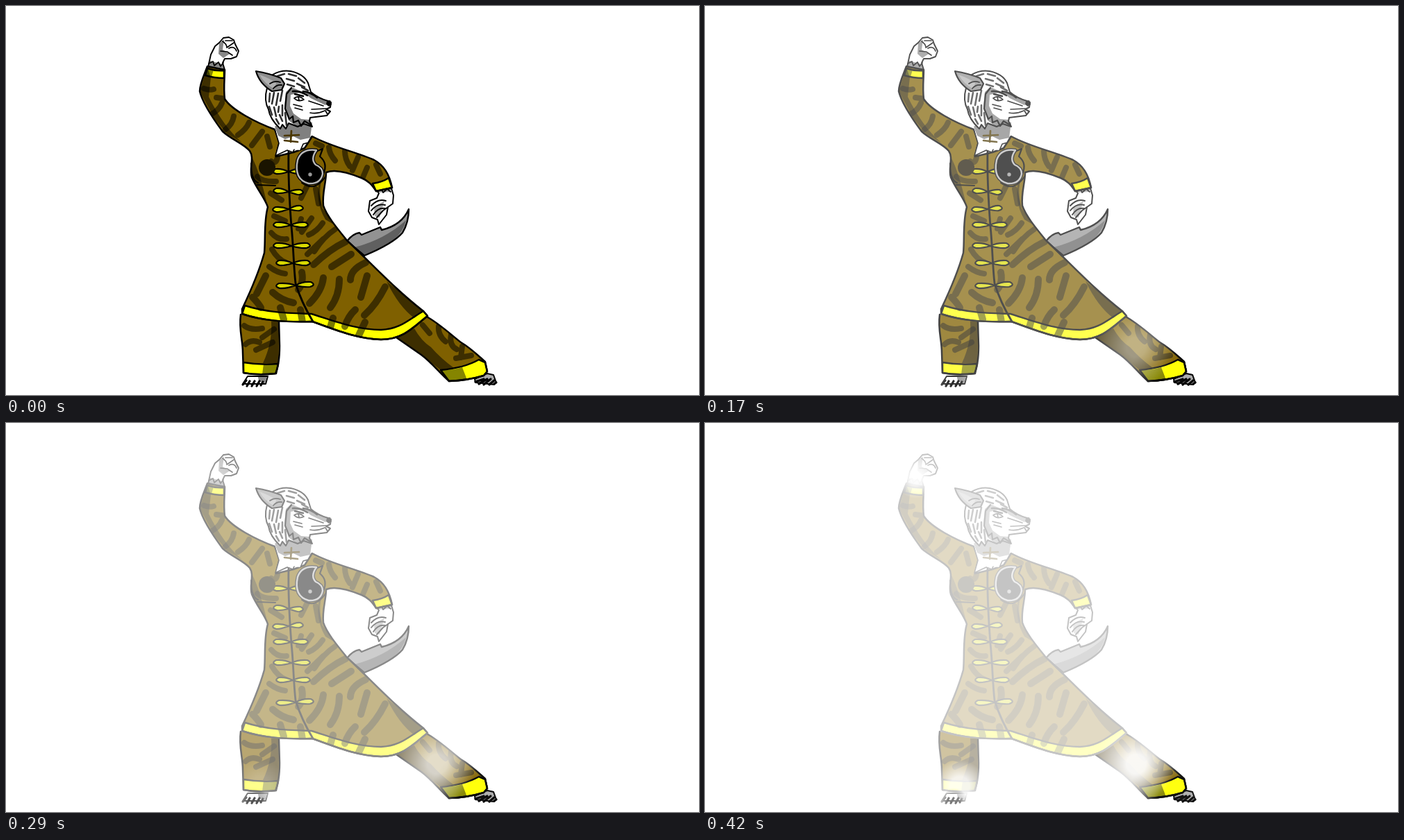
Write an HTML page with a canvas that moves like this. It is 998 px wide and 561 px high and loops after 870 ms.

```html
<!DOCTYPE html>
<html lang="en">
<head>
<meta charset="utf-8">
<title>Fading stance</title>
<style>
html, body { margin: 0; width: 100%; height: 100%; overflow: hidden; background: #fff; }
canvas { display: block; width: 100%; height: 100%; }
</style>
</head>
<body>
<canvas id="stage" width="998" height="561"></canvas>
<script>
const W = 998, H = 561, LOOP = 870;
const STEPS = [0, 40, 80, 130, 170, 210, 250, 290, 330, 380, 420];
const FADE = 0.077;
const BROWN = '#7f6000', YELLOW = '#ffff00', OLIVE = '#858500';
const screen = document.getElementById('stage').getContext('2d');
const layer = document.createElement('canvas');
layer.width = W;
layer.height = H;
const g = layer.getContext('2d');
let veil = 0;

const P = d => new Path2D(d);

// Mixes a hex colour with white.
function ink(hex) {
  const c = [1, 3, 5].map(i => parseInt(hex.slice(i, i + 2), 16));
  return `rgb(${c.map(v => Math.round(v + (255 - v) * veil))})`;
}
function fill(path, hex) {
  g.fillStyle = ink(hex);
  g.fill(path);
}
function line(path, width = 2.4, hex = '#000000') {
  g.strokeStyle = ink(hex);
  g.lineWidth = width;
  g.stroke(path);
}
function shape(path, hex, width = 2.4) {
  fill(path, hex);
  line(path, width);
}

const coat = {
  pieces: [P(`M290 87C286 98 279 112 279 123C283 140 298 162 312 181C324 192 343 199 351 209
    C358 219 350 234 354 247C360 262 374 279 377 290C371 312 374 335 372 356C364 385 350 416 340 437
    L340 444C370 454 400 456 441 455C475 467 505 480 540 481C572 481 588 462 607 447L601 440
    C560 408 530 375 491 338C478 322 462 303 457 288C455 270 461 255 461 240C475 234 500 243 512 248
    C522 252 527 258 533 267L556 262C553 246 545 230 530 222C503 210 468 203 441 188L430 205L414 211
    L389 217L394 195L387 178C360 168 325 150 315 134C313 118 315 105 315 92Z`)],
  bands: [
    P(`M344 432C375 442 405 443 440 444C475 455 505 467 540 467C568 466 580 452 601 440
      L607 447C588 462 572 481 540 481C505 480 475 467 441 455C400 456 370 454 340 444Z`),
    P('M290 90Q302 94 314 93L314 104Q300 104 287 100Z'),
    P('M528 256Q542 254 551 248L556 262L533 267Z')
  ],
  bandShade: P('M290 90L299 92L296 102L287 100Z'),
  shade: P(`M290 88L279 123L300 162L318 184L340 197Q313 174 292 131L295 103Z
    M460 238Q447 260 456 292L472 315L460 308Q444 282 452 246Z
    M548 397L601 440L588 450Q566 434 548 397ZM354 218Q365 237 377 290L367 269L354 247Z`),
  stripes: P(`M285 119Q293 122 299 120M303 132L317 134M296 156Q307 150 311 140M316 178Q326 171 328 159
    M334 186Q346 178 350 168M354 201L369 181M376 188L380 203M446 198L455 202M465 204Q466 214 474 223
    M488 209Q488 221 495 231M507 218L499 237M520 233L514 247M533 229L539 242
    M382 224Q389 229 391 218M362 246Q370 254 389 253M381 270L397 280M434 259L425 277
    M446 264L450 285M386 303L402 310M425 307L421 321M382 327Q391 338 404 336M440 306L426 326
    M456 313Q448 325 436 330M474 322Q457 333 444 354M457 336L434 358
    M383 351Q391 365 403 370M379 376Q391 385 402 386`),
  wideStripes: P(`M489 340Q466 351 443 373M497 358L469 376M374 389L361 415M384 413Q397 425 414 428
    M426 384Q429 399 421 409M457 392Q455 411 437 429M480 394Q480 418 467 435M518 370Q496 380 496 395
    M520 389Q516 403 511 420M546 405Q533 431 516 446M503 438Q493 447 488 462M355 420Q363 428 367 435
    M395 435L400 452M424 438L427 456M471 450L466 467M517 456L508 475`)
};

const trousers = {
  pieces: [
    P('M338 445C335 468 341 480 341 500L342 529Q362 533 388 530Q394 517 394 490L393 455'),
    P('M604 447C623 457 642 475 655 485C669 493 682 506 690 513L693 527L688 533Q665 540 638 541C625 530 613 514 598 503L562 478')
  ],
  bands: [
    P('M342 514Q365 518 392 516L389 530Q362 533 342 529Z'),
    P('M626 525Q660 522 681 510L690 514L693 527L688 533Q665 540 638 541Z')
  ],
  bandShade: P('M371 516L392 516L389 530L369 531ZM626 525Q645 525 657 521L664 539L638 541Z'),
  shade: P(`M382 455L393 455L392 515L370 515Q384 485 382 455Z
    M563 478L588 465Q598 483 612 492Q626 508 645 522L626 525L598 503Z`),
  stripes: P(`M343 461Q352 468 369 465M345 488Q353 480 365 485M360 496L384 485M369 478L386 466
    M600 460L610 472M623 462Q622 475 633 484M641 474Q638 490 649 495M657 491L655 507M670 504L648 508`),
  wideStripes: P()
};

function drawGarment({ pieces, bands, bandShade, shade, stripes, wideStripes }) {
  const cloth = P();
  pieces.forEach(p => cloth.addPath(p));
  fill(cloth, BROWN);
  bands.forEach(p => fill(p, YELLOW));
  fill(bandShade, OLIVE);

  // Shade and stripes share one tone where they overlap.
  g.save();
  g.clip(cloth);
  g.globalAlpha = .52;
  fill(shade, '#000000');
  line(stripes, 8);
  line(wideStripes, 10);
  g.restore();
  [...pieces, ...bands].forEach(p => line(p, 2.5));
}

function drawTail() {
  const tail = P(`M491 339Q500 328 509 327L512 330L539 319L541 323Q570 316 580 293Q580 312 571 327Q557 343 516 360Z`);
  fill(tail, '#929292');
  fill(P('M502 348Q545 337 576 309Q570 340 516 360Z'), '#606060');
  line(tail, 2.4);
}

function drawFeet() {
  shape(P('M348 534L341 545L374 545L377 534Z'), '#ffffff', 2);
  fill(P('M363 535L376 535L373 544L364 541Z'), '#888888');
  line(P('M341 546L346 540M347 548L351 541M354 548L358 541M361 548L365 541M367 547L370 542'), 3.2);
  shape(P('M675 538Q686 533 693 530L702 532L706 543L703 546L676 543Z'), '#aaaaaa', 2);
  line(P('M676 542L688 538M681 545L693 538M688 546L698 538M696 546L703 540M703 545L706 543'), 3.2);
}

function drawHands() {
  const fist = P('M291 88L295 70L301 58L307 53L313 46L321 45L328 49L330 55L335 65L332 73L324 76L315 76L312 82L315 92Z');
  fill(fist, '#ffffff');
  fill(P('M307 54L314 48L312 63L322 69L313 75L306 69ZM294 79L312 84L315 92L291 89Z'), '#888888');
  line(fist, 1.9);
  line(P('M292 83L298 80L300 86L306 81L309 87L313 82M312 51Q318 55 318 60L328 53M309 65L319 66M321 61Q329 57 332 65M320 67L326 71M316 50L326 50'), 1.7);

  const paw = P('M534 266L537 270L534 277L524 281L522 296L527 305L535 308L537 315L541 310L548 301L550 290L557 285L558 273L555 263Z');
  fill(paw, '#ffffff');
  fill(P('M535 264L555 262L554 268L538 269ZM530 290L545 281L538 305L531 303Z'), '#aaaaaa');
  line(paw, 2);
  line(P('M535 268L541 264L543 269L549 264L554 268M526 288Q536 277 547 281M526 295Q535 284 546 287M529 301Q536 290 546 292M534 305L543 295L550 290'), 1.9);
}

// A pair of narrow loops joined at the middle.
function clasp(x, y, left, right, tilt = 0) {
  for (const end of [left, right]) {
    const side = Math.sign(end - x), dy = -side * tilt;
    const loop = P(`M${x} ${y}Q${x + side * 10} ${y - 5 + dy} ${end - side * 4} ${y - 4 + dy}
      Q${end + side * 4} ${y + dy} ${end - side * 5} ${y + 3 + dy}Q${x + side * 14} ${y + 4 + dy} ${x} ${y}`);
    shape(loop, '#d9d900', 2.2);
  }
}

function drawFront() {
  line(P('M353 227Q353 251 363 255M362 258L388 259M426 255Q445 269 460 246'), 2);
  line(P('M407 209C406 250 409 292 411 318C414 346 414 374 417 400C424 423 433 440 442 455'), 2.8);
  clasp(407, 239, 384, 428);
  clasp(407, 268, 385, 428, -1);
  clasp(407, 293, 384, 428, 1);
  clasp(410, 316, 385, 435);
  clasp(411, 346, 385, 438);
  clasp(413, 371, 389, 438);
  clasp(417, 403, 389, 443, 1);
}

function drawBadges() {
  const round = P();
  round.arc(376, 233, 12, 0, Math.PI * 2);
  fill(round, '#1a1400');
  line(P('M446 210L456 206L452 217Q464 227 457 242Q451 254 440 256'), 2.2);
  const drop = P('M447 208Q426 205 420 222Q414 250 436 256Q453 257 456 242Q456 233 446 229Q438 221 447 208Z');
  shape(drop, '#000000', 5);
  line(drop, 2.4, '#b8b8b8');
  const dot = P();
  dot.arc(438, 243, 2.7, 0, Math.PI * 2);
  fill(dot, '#999999');
}

function drawHead() {
  const bib = P('M387 174L393 198L388 216L405 208L413 211L415 207L424 208L428 199L435 197L440 187L440 170Z');
  fill(bib, '#ffffff');
  fill(P('M387 174L392 187L402 192L414 188L424 193L438 190L441 168L405 160Z'), '#808080');
  line(P('M387 178L393 198L388 216L405 208L413 211L415 207M440 188L435 197L428 199L424 208'), 1.6);
  line(P('M411 180L410 196M401 187L422 186M401 194L420 196'), 2.7, '#4b3700');

  const head = P(`M384 99Q396 92 410 94Q429 98 435 111L439 124Q449 133 464 137L468 139L467 146L461 149
    L467 152L462 158L438 161L437 166L441 174L429 170L420 174L407 169L403 177L398 171L395 177
    Q380 163 378 149Q371 136 376 118Z`);
  fill(head, '#ffffff');
  fill(P('M411 117L403 124L401 145L407 165L419 174L429 170L441 174L437 164L425 163L414 155L409 144L410 128L427 124Z'), '#808080');
  fill(P('M426 122L439 125L465 138L460 143L439 133Z'), '#808080');
  line(head, 2);
  line(P('M411 118L404 127L402 148L408 163L413 159L414 168L421 165L425 173L430 166L440 172'), 2.2);
  line(P(`M391 101L401 98M407 98L418 101M404 105L415 108M421 104L430 111M419 112L430 117M405 113L415 116
    M426 117L435 122M380 126L379 138M386 125L383 141M392 126L389 143M398 122L395 137M379 145L383 157
    M386 146L389 159M393 145L392 153M398 143L398 158M389 163L393 170M394 157L398 166M402 154L404 172`), 2.6, '#303030');
  // Brow, eye, muzzle and cheek marks.
  line(P('M413 123Q423 122 434 129M416 127L428 130M428 123Q438 124 448 132'), 2.6);
  line(P('M415 133Q422 128 429 135Q421 139 415 133M421 131L422 136M414 142L426 145M416 147L427 150M438 154Q449 156 459 151M440 149L461 148M436 137L457 144'), 1.7);
  fill(P('M462 137L467 136L469 142L465 145L461 142Z'), '#000000');
  line(P('M460 151L463 156'), 1.7);

  const ear = P('M360 94Q379 97 396 104L401 112L397 121L383 123Q365 112 360 94Z');
  fill(ear, '#8c8c8c');
  fill(P('M365 99Q379 104 389 111L387 120Q372 112 365 99Z'), '#b0b0b0');
  line(ear, 2.2);
  line(P('M380 112Q387 107 395 110M385 119Q390 113 397 114'), 1.8);
}

function drawFigure(amount) {
  g.globalCompositeOperation = 'source-over';
  g.clearRect(0, 0, W, H);
  g.lineCap = g.lineJoin = 'round';
  veil = amount;
  drawTail();
  drawFeet();
  drawHands();
  veil = amount * .82;
  drawGarment(trousers);
  veil = amount;
  drawGarment(coat);
  drawFront();
  drawBadges();
  drawHead();
}

function glow(ctx, x, y, inner, outer, alpha) {
  const soft = ctx.createRadialGradient(x, y, inner, x, y, outer);
  soft.addColorStop(0, `rgba(255,255,255,${alpha})`);
  soft.addColorStop(1, 'rgba(255,255,255,0)');
  ctx.fillStyle = soft;
  ctx.fillRect(0, 0, W, H);
}

// Puts the unfaded drawing back inside a soft disc.
function restore(x, y, inner, outer, alpha) {
  drawFigure(0);
  g.globalCompositeOperation = 'destination-in';
  glow(g, x, y, inner, outer, alpha);
  screen.drawImage(layer, 0, 0);
}

function render(step) {
  const amount = step * FADE, late = (step / 10) ** 4;
  screen.fillStyle = '#fff';
  screen.fillRect(0, 0, W, H);
  drawFigure(amount);
  screen.drawImage(layer, 0, 0);
  if (!step) return;
  restore(690, 548, 38, 82, .9);
  glow(screen, 621, 492, 14, 56, amount * 1.15);
  glow(screen, 367, 524, 14, 38, late * .8);
  glow(screen, 304, 79, 8, 30, late * .9);
  restore(358, 546, 8, 20, .45);
}

let shown = -1;
function tick() {
  const t = performance.now() % LOOP;
  const step = STEPS.filter(s => s <= t).length - 1;
  if (step !== shown) render(shown = step);
  requestAnimationFrame(tick);
}
tick();
</script>
</body>
</html>
```
